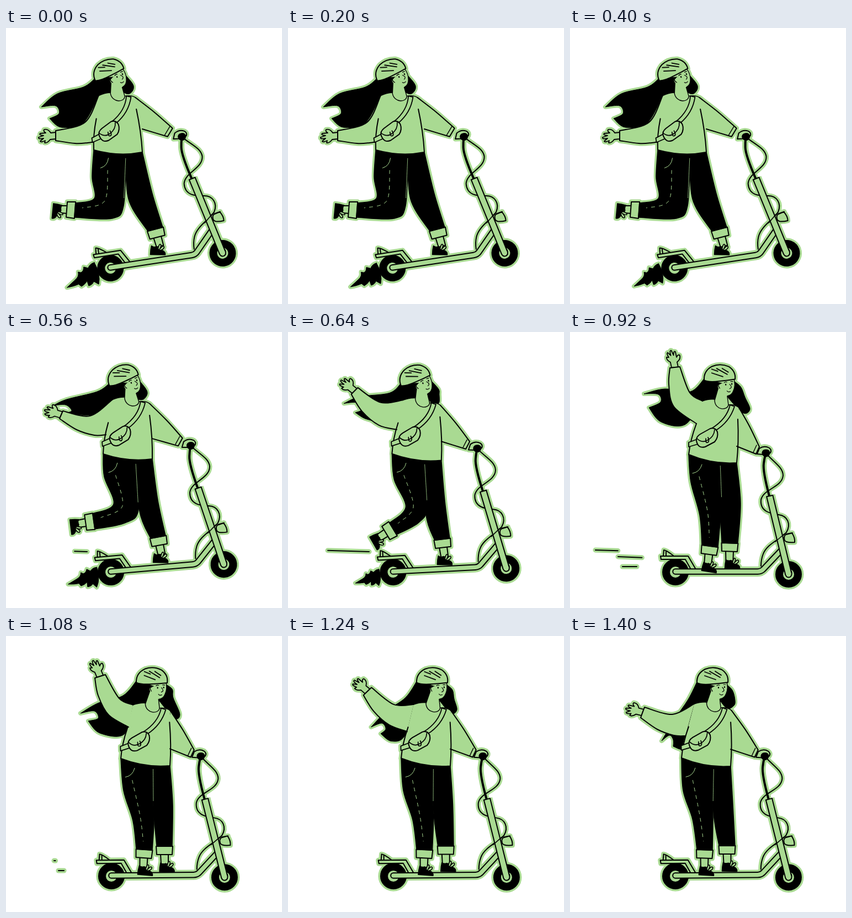
These frames come from a looping animation (500x500 px, 1440 ms). An HTML page with a canvas:

```html
<!DOCTYPE html>
<html lang="en">
<head>
<meta charset="utf-8">
<title>Scooter ride</title>
<style>
  html, body { margin: 0; width: 100%; height: 100%; overflow: hidden; background: #fff; }
  canvas { display: block; width: 100vw; height: 100vh; }
</style>
</head>
<body>
<canvas id="stage" width="500" height="500"></canvas>
<script>
const ctx = document.getElementById('stage').getContext('2d');
const GREEN = '#a9da92', BLACK = '#000';
const LOOP = 1440, STEP = 40, TILT = -8.7;

// Key poses. body: hem left, hem right, neck; head: x, y, angle.
const ride = {
  body: [159,221, 247,225, 204,129], head: [187,83,-22], tilt: [TILT],
  arm: [143,171, 90,186, 90,204, 125,209, 148,208, 159,206],
  back: [156,270, 160,309, 126,317, 124,343, 192,345, 213,322],
  front: [265,300, 284,361, 257,368, 222,310],
  mane: [140,107, 93,119, 64,143, 90,141, 96,155, 79,164, 100,180, 140,172],
  tail: [228,99, 231,110, 224,119, 214,117]
};
const poses = [
  { t: 0, ...ride },
  { t: 400, ...ride },
  { t: 560,
    body: [176,221, 265,230, 229,131], head: [213,86,-20], tilt: [-5],
    arm: [152,152, 103,143, 97,157, 128,177, 160,187, 181,186],
    back: [178,262, 195,312, 157,329, 161,357, 215,346, 240,322],
    front: [275,305, 289,369, 262,374, 242,325],
    mane: [165,108, 110,122, 86,133, 108,132, 119,142, 112,146, 135,150, 160,148],
    tail: [252,101, 256,112, 249,122, 238,121] },
  { t: 760,
    body: [207,220, 297,236, 268,136], head: [257,87,-17], tilt: [0],
    arm: [211,108, 192,62, 174,65, 171,100, 186,142, 222,163],
    back: [214,275, 241,325, 224,371, 250,382, 268,345, 271,310],
    front: [298,310, 299,381, 271,382, 262,340],
    mane: [212,114, 160,110, 124,124, 150,122, 156,138, 137,146, 155,170, 200,178],
    tail: [302,104, 301,116, 310,138, 299,146] },
  { t: 920,
    body: [215,222, 302,237, 275,136], head: [271,85,-1], tilt: [0],
    arm: [217,110, 199,63, 181,65, 179,95, 188,135, 229,166],
    back: [219,272, 235,332, 239,386, 268,390, 273,335, 275,310],
    front: [309,310, 304,383, 275,382, 272,320],
    mane: [218,108, 172,103, 134,112, 160,113, 164,127, 143,137, 165,163, 208,168],
    tail: [309,99, 317,118, 326,140, 312,146] },
  { t: 1080,
    body: [208,222, 297,235, 266,135], head: [264,83,2], tilt: [-.5],
    arm: [205,113, 180,70, 161,76, 167,108, 186,143, 222,165],
    back: [213,280, 230,335, 236,386, 265,388, 268,340, 267,310],
    front: [302,305, 301,381, 273,381, 268,320],
    mane: [212,108, 168,121, 135,140, 160,136, 167,149, 149,154, 170,176, 214,178],
    tail: [301,96, 303,112, 315,142, 304,148] },
  { t: 1400,
    body: [202,221, 291,236, 261,134], head: [258,83,0], tilt: [-.5],
    arm: [185,142, 135,129, 128,148, 158,169, 188,180, 209,181],
    back: [205,280, 222,332, 230,387, 258,388, 259,340, 259,310],
    front: [295,305, 299,380, 270,380, 260,320],
    mane: [214,115, 190,150, 166,190, 180,180, 187,188, 187,200, 204,205, 208,185],
    tail: [294,98, 299,116, 297,126, 284,131] }
];

// y, slope, left, right, head start, head end, tail start, tail end
const speedLines = [
  [395, .03, 46, 147, 525, 680, 780, 1015],
  [407, .04, 87, 138, 690, 780, 890, 1090],
  [425, 0, 95, 121, 735, 806, 985, 1140]
];

const mix = (a, b, p) => a + (b - a) * p;
const clamp = v => Math.max(0, Math.min(1, v));
const ramp = (t, a, b) => clamp((t - a) / (b - a));
const mixAll = (a, b, p) => a.map((v, i) => mix(v, b[i], p));
const mid = (a, b, p = .5) => mixAll(a, b, p);
const pairs = a => a.flatMap((v, i) => i % 2 ? [] : [[v, a[i + 1]]]);
const at = (m, x, y) => { const q = m.transformPoint({ x, y }); return [q.x, q.y]; };

// Torso drawings use the upright pose; this maps them onto another one.
const torsoRef = new DOMMatrix([87, 15, 60, -86, 215, 222]).inverse();
function torsoMatrix([lx, ly, rx, ry, nx, ny]) {
  return new DOMMatrix([rx - lx, ry - ly, nx - lx, ny - ly, lx, ly]).multiply(torsoRef);
}
const shoulder = body => at(torsoMatrix(body), 240, 125);

// The arm swings about its shoulder, so mix angle and length.
function mixArm(a, b, p) {
  const sa = shoulder(a.body), sb = shoulder(b.body);
  const s = shoulder(mixAll(a.body, b.body, p));
  const qb = pairs(b.arm);
  return pairs(a.arm).map(([x, y], i) => {
    const ax = x - sa[0], ay = y - sa[1], bx = qb[i][0] - sb[0], by = qb[i][1] - sb[1];
    const from = Math.atan2(ay, ax);
    const turn = Math.atan2(ax * by - ay * bx, ax * bx + ay * by);
    const r = mix(Math.hypot(ax, ay), Math.hypot(bx, by), p), w = from + turn * p;
    return [s[0] + r * Math.cos(w), s[1] + r * Math.sin(w)];
  });
}

function poseAt(t) {
  let i = 0;
  while (i < poses.length - 2 && t >= poses[i + 1].t) i++;
  const a = poses[i], b = poses[i + 1];
  let p = ramp(t, a.t, b.t);
  if (i === 1) p = p * (1 + p) / 2;
  if (i === poses.length - 2) p = mix(p, p * p * (3 - 2 * p), .5);
  const out = {};
  for (const k of ['body', 'head', 'tilt', 'back', 'front', 'mane', 'tail']) out[k] = mixAll(a[k], b[k], p);
  out.arm = mixArm(a, b, p);
  return out;
}

let parts;
function add(path, fill, stroke = BLACK, width = 2, extra = {}) {
  parts.push({ path, fill, stroke, width, halo: true, ...extra });
}
function glyph(m, d, fill, stroke, width, extra) {
  const path = new Path2D();
  path.addPath(new Path2D(d), m);
  add(path, fill, stroke, width, extra);
}
// Smooth curve through points, continuing the path.
function curve(path, pts) {
  for (let i = 0; i < pts.length - 1; i++) {
    const a = pts[i - 1] || pts[i], b = pts[i], c = pts[i + 1], d = pts[i + 2] || c;
    path.bezierCurveTo(b[0] + (c[0] - a[0]) / 6, b[1] + (c[1] - a[1]) / 6,
      c[0] - (d[0] - b[0]) / 6, c[1] - (d[1] - b[1]) / 6, c[0], c[1]);
  }
}
function chain(...runs) {
  const path = new Path2D();
  path.moveTo(...runs[0][0]);
  runs.forEach((run, i) => { if (i) path.lineTo(...run[0]); curve(path, run); });
  return path;
}
// Frame centred on an edge a-b with y pointing out of the limb.
function edgeFrame(a, b) {
  const w = Math.atan2(b[1] - a[1], b[0] - a[0]), c = Math.cos(w), s = Math.sin(w);
  return new DOMMatrix([c, s, -s, c, (a[0] + b[0]) / 2, (a[1] + b[1]) / 2]);
}

function drawLines(t) {
  for (const [y, k, x0, x1, h0, h1, t0, t1] of speedLines) {
    if (t <= h0 || t >= t1) continue;
    const l = mix(x1, x0, ramp(t, h0, h1)), r = mix(x1, x0, ramp(t, t0, t1));
    add(new Path2D(`M${l} ${y + k * (l - x0)}L${r} ${y + k * (r - x0)}`));
  }
}

function drawFlame(t) {
  const size = (.96 + .05 * Math.cos(t * Math.PI / 80)) * (1 - .78 * ramp(t, 580, 760));
  if (t >= 800) return;
  const m = new DOMMatrix().translate(166, 446).rotate(12 * ramp(t, 400, 560)).scale(size);
  glyph(m, 'M-6-21Q-14-19-17-11L-25-13Q-25-5-30-3L-35-4Q-33 4-40 10L-55 24Q-43 22-34 18L-29 22Q-22 18-19 12L-16 21Q-9 19-7 13L2 18Q6 0-6-21Z',
    BLACK, BLACK, 1);
}

function drawScooter(m) {
  glyph(m, 'M357 222C372 238 386 246 386 260C384 282 350 284 346 304C344 326 364 329 378 331C394 333 401 348 392 363C380 376 357 384 350 402Q346 412 346 424');
  glyph(m, 'M361 297Q349 252 351 238Q352 230 354 222', null, BLACK, 4);
  for (const [x, y] of [[191, 435], [396, 439]]) {
    const ring = r => `M${x - r} ${y}a${r} ${r} 0 1 0 ${2 * r} 0a${r} ${r} 0 1 0 ${-2 * r} 0Z`;
    glyph(m, ring(23), BLACK, BLACK, 2);
    glyph(m, ring(10), GREEN, null, 0);
  }
  glyph(m, 'M169 406L170 395Q174 395 187 405M174 397V405', GREEN);
  glyph(m, 'M164 406H214L228 430H219L209 412H165Z', GREEN);
  const deck = 'M191 434H340Q346 434 350 430L384 394', stem = 'M361.5 296L396 439';
  glyph(m, deck, null, BLACK, 11.5);
  glyph(m, deck, null, GREEN, 7.5);
  glyph(m, stem, null, BLACK, 13.5, { cap: 'butt' });
  glyph(m, 'M396 436V439', null, BLACK, 13);
  glyph(m, 'M362 298L396 439', null, GREEN, 9.5, { cap: 'butt' });
  glyph(m, 'M396 438V439', null, GREEN, 9);
  glyph(m, 'M372 380L388 366', null, BLACK, 1.6);
  glyph(m, 'M389 378Q386 370 392 366L402 364Q408 373 407 381Q398 382 392 380ZM391 367L403 364', GREEN);
}

function drawFoot(frame, angle, lift) {
  const m = frame.translate(0, -lift).rotate(angle);
  glyph(frame, `M-7 14L-6 ${32 - lift}H7L7 14`, GREEN);
  glyph(m, 'M-7 30Q-9 38-9 46L18 46.5Q19 41 12 38Q4 34 2 31Q-2 34-7 30Z', BLACK, BLACK, 1.5);
  glyph(m, 'M5 35Q7 25 10 28Q11 31 8 36Q14 28 16 32Q16 36 10 38', GREEN, BLACK, 1.6);
  glyph(frame, 'M-15 0H15L14 15H-14Z', GREEN);
}

function drawPerson(p, scoot) {
  const lean = p.tilt[0] / TILT;
  const torso = torsoMatrix(p.body);
  const head = new DOMMatrix().translate(p.head[0], p.head[1]).rotate(p.head[2]);
  const [hemL, hemR, neck] = pairs(p.body);

  // hair
  const h = pairs(p.mane);
  const nape = at(head, -27, -2);
  add(chain([nape, h[0], h[1], h[2]], [h[2], h[3], h[4], h[5]],
    [h[5], h[6], h[7], shoulder(p.body)], [neck, at(head, 6, 8)]), BLACK, BLACK, 1);
  add(chain([at(head, 22, 2), ...pairs(p.tail), at(head, 8, 26)]), BLACK, BLACK, 1);

  // legs
  const waist = at(torso, 272, 235);
  const [fo, fr, fq, fk] = pairs(p.front);
  const fFrame = edgeFrame(fq, fr);
  drawFoot(fFrame, -Math.atan2(fr[1] - fq[1], fr[0] - fq[0]) * 180 / Math.PI, 0);
  add(chain([hemR, fo, fr], [fq, fk, waist]), BLACK, BLACK, 1.5);
  const [a, b, c, d, e, f] = pairs(p.back);
  drawFoot(edgeFrame(c, d), 0, 6 * lean);
  add(chain([hemL, a, b, c], [d, e, f, waist]), BLACK, BLACK, 1.5);
  const inner = { halo: false };
  add(chain([mid(waist, f, .1), mid(waist, f, .85)]), null, GREEN, .8, inner);
  glyph(torso, 'M239 240Q235 254 222 256', null, GREEN, 1, inner);
  add(chain([at(torso, 234, 262), mid(b, f, .35), mid(mid(b, f, .35), mid(c, d), .75)]),
    null, GREEN, 1, { halo: false, dash: [6, 8] });

  // sweater
  glyph(torso, 'M240 125Q252 121 262 122L287 132Q298 131 306 137L304 158L302 237Q258 240 215 222Q216 195 229 166Z', GREEN, null, 0);
  const hemSide = 'M304 158Q306 200 302 237Q258 240 215 222Q218 195 229 166';
  const grip = at(scoot, 355, 219);
  const cuffU = [grip[0] - mix(12, 17, lean), grip[1] - mix(11, 15, lean)];
  const cuffL = [grip[0] - mix(18, 26, lean), grip[1] + mix(2, 0, lean)];
  const under = [hemR[0], hemR[1] - mix(30, 42, lean)];
  const top = at(torso, 306, 137), elbow = mid(top, cuffU);
  add(chain([top, [elbow[0] + 1, elbow[1] - 1], cuffU], [cuffL, under]), GREEN);
  const band = q => [q[0] - 5, q[1] - 3];
  add(chain([band(cuffU), band(cuffL)]), null, BLACK, 1.4);
  glyph(torso, 'M240 125Q252 121 262 122M287 132Q300 131 306 137', null, BLACK, 1.6);

  // waving arm
  const [m, i, o, o1, o2, end] = p.arm;
  glyph(edgeFrame(i, o), 'M-6 0L-5 9Q-13 14-11 21Q-8 23-5 18L-4 28Q-1 31 0 22L3 31Q7 32 5 22L10 28Q13 27 9 19L13 20Q14 15 7 10L6 0Z', GREEN, BLACK, 1.8);
  add(chain([shoulder(p.body), m, i], [o, o1, o2, end]), GREEN);
  glyph(torso, hemSide, null, BLACK, 2);

  // bag
  glyph(torso, 'M215 200L231 194L232 203L215 208ZM256 175Q284 158 290 132L298 135Q289 163 263 179Z', GREEN, BLACK, 1.8);
  glyph(torso, 'M229 197Q228 190 236 185L254 175Q263 172 267 181Q269 191 262 199L245 208Q232 212 229 197Z', GREEN);
  glyph(torso, 'M230 193Q239 202 249 196Q261 190 262 177M246 193Q245 202 250 200Q253 197 250 191', null, BLACK, 1.7);

  // neck and head
  const n = new Path2D();
  n.moveTo(...at(head, -2, 14));
  n.lineTo(...at(torso, 262, 124));
  n.bezierCurveTo(...at(torso, 263, 142), ...at(torso, 285, 143), ...at(torso, 287, 132));
  n.lineTo(...at(head, 13, 28));
  add(n, GREEN, BLACK, 1.4);
  glyph(head, 'M25-2Q29 12 25 21Q22 30 14 31Q8 31 4 26L-2 18Q-6 10 1 9Q9 8 13-2Z', GREEN, null, 0);
  glyph(head, 'M26 0Q29 12 25 21Q22 30 14 31M0 17Q-5 10 1 9', null, BLACK, 1.3);
  glyph(head, 'M11 10v1M22 9v1', null, BLACK, 2.2);
  glyph(head, 'M8 7Q10 5 13 6M20 5L24 5M18 10Q24 16 18 18M13 22Q15 25 19 23', null, BLACK, 1.2);
  glyph(head, 'M-28 2Q-29-15-13-23Q2-29 17-22Q30-13 28 1Q14 3 0 4Q-20 6-28 2Z', GREEN);
  glyph(head, 'M-14-11L6-4M-14-18L-3-14M-5-19L14-8M5-19L16-12', null, BLACK, 1.8);

  // gripping hand
  glyph(scoot, 'M343 211Q352 205 361 210Q366 214 363 219L350 222L339 221Z', GREEN);
  glyph(scoot, 'M348 219Q348 213 355 213Q362 213 362 219Q361 226 355 226Q348 225 348 219Z', BLACK, BLACK, 1);
}

function render(t) {
  parts = [];
  const p = poseAt(t);
  const scoot = new DOMMatrix().translate(191 + p.tilt[0] / 5, 435).rotate(p.tilt[0]).translate(-191, -435);
  drawLines(t);
  drawFlame(t);
  drawScooter(scoot);
  drawPerson(p, scoot);

  ctx.clearRect(0, 0, 500, 500);
  ctx.lineJoin = 'round';
  ctx.setLineDash([]);
  ctx.strokeStyle = GREEN;
  for (const s of parts) {
    if (!s.halo) continue;
    ctx.lineCap = s.cap || 'round';
    ctx.lineWidth = s.width + 7;
    ctx.stroke(s.path);
  }
  for (const s of parts) {
    if (s.fill) { ctx.fillStyle = s.fill; ctx.fill(s.path); }
    if (!s.stroke) continue;
    ctx.lineCap = s.cap || 'round';
    ctx.setLineDash(s.dash || []);
    ctx.strokeStyle = s.stroke;
    ctx.lineWidth = s.width;
    ctx.stroke(s.path);
  }
}

function tick() {
  render(Math.floor(performance.now() % LOOP / STEP) * STEP);
  requestAnimationFrame(tick);
}
tick();
</script>
</body>
</html>
```
